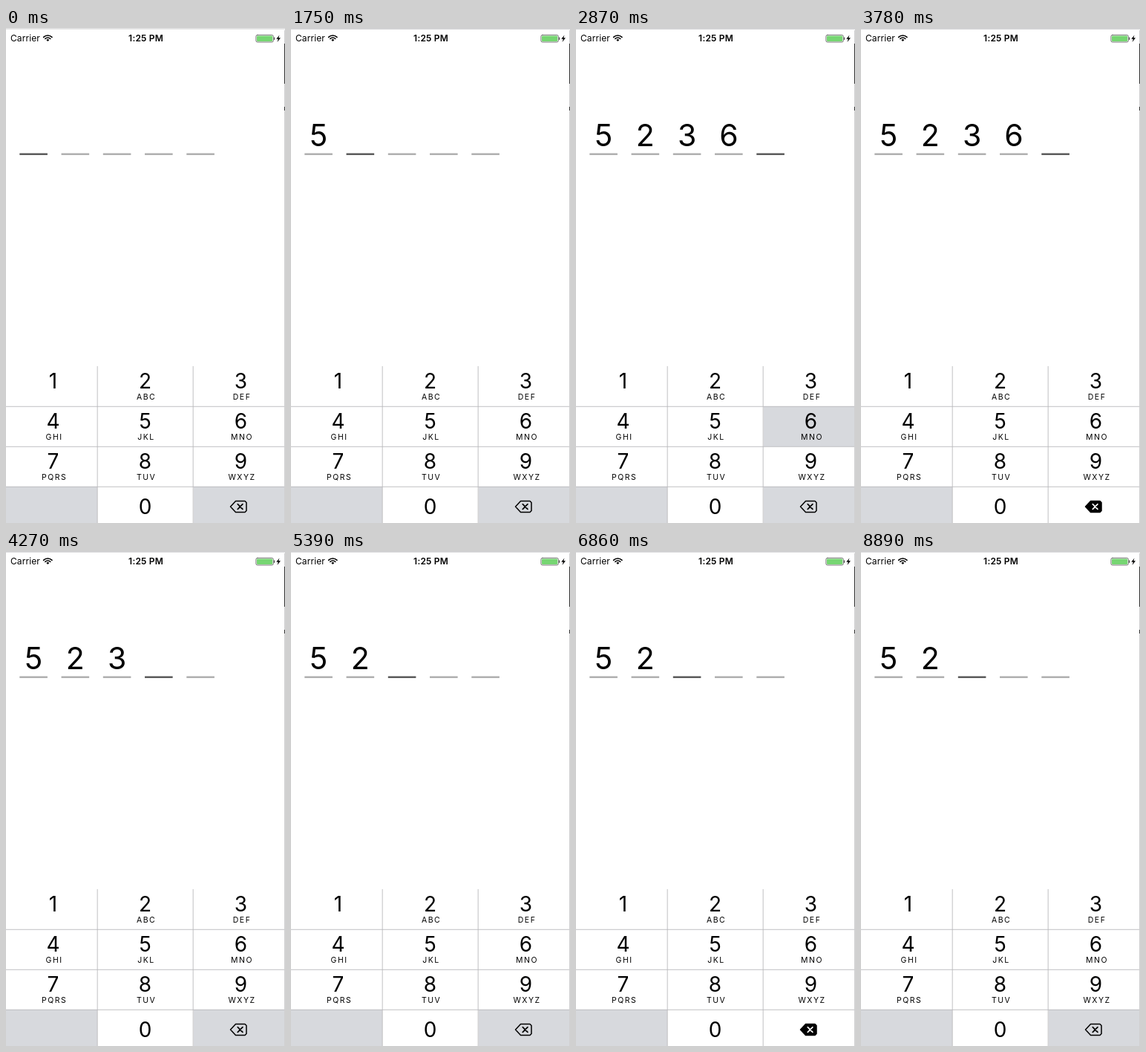
Write an HTML page with a canvas that moves like this. It is 376 by 666 pixels and loops after 9.1 s.

```html
<!DOCTYPE html>
<html lang="en">
<head>
<meta charset="utf-8">
<title>Code entry</title>
<style>
html, body { margin: 0; width: 100%; height: 100%; overflow: hidden; background: #fff; }
canvas { display: block; width: 376px; height: 666px; }
</style>
</head>
<body>
<canvas id="stage"></canvas>
<script>
const W = 376, H = 666, LOOP = 9100;
const FONT = 'Inter, Roboto, sans-serif';
const KEY_GREY = '#d7d9dd', RULE = '#b9babc';
const canvas = document.getElementById('stage');
const ratio = window.devicePixelRatio || 1;
canvas.width = W * ratio;
canvas.height = H * ratio;
const ctx = canvas.getContext('2d');

// Each tap: key, finger down, value changes, highlight ends.
const taps = [
  ['5', 1400, 1470, 1540],
  ['2', 1820, 1960, 2030],
  ['3', 2240, 2310, 2450],
  ['6', 2590, 2660, 2730],
  ['6', 2870, 2940, 3150],
  ['del', 3570, 3570, 3920],
  ['del', 4060, 4060, 4270],
  ['del', 4550, 4550, 4690],
  ['5', 5530, 5600, 5740],
  ['6', 6020, 6020, 6090],
  ['del', 6370, 6370, 6650],
  ['del', 6860, 6860, 7000]
];

const letters = ['', 'ABC', 'DEF', 'GHI', 'JKL', 'MNO', 'PQRS', 'TUV', 'WXYZ'];
const colLeft = [0, 124, 253], colRight = [123, 252, 375];
const colMid = [63.5, 187.5, 316.5];
const rowTop = row => 455 + 54 * row;

function stateAt(t) {
  let code = '', pressed = null;
  for (const [key, down, change, up] of taps) {
    if (t >= change) code = key === 'del' ? code.slice(0, -1) : code + key;
    if (t >= down && t < up) pressed = key;
  }
  return { code, pressed };
}

function rect(x, y, w, h, color) {
  ctx.fillStyle = color;
  ctx.fillRect(x, y, w, h);
}

function text(str, x, y, size, { weight = 400, align = 'center', spacing = 0 } = {}) {
  ctx.font = `${weight} ${size}px ${FONT}`;
  ctx.textAlign = align;
  ctx.letterSpacing = spacing + 'px';
  ctx.fillStyle = '#000';
  ctx.fillText(str, x + (align === 'center' ? spacing / 2 : 0), y);
}

function polygon(points) {
  ctx.beginPath();
  points.forEach(([x, y]) => ctx.lineTo(x, y));
  ctx.closePath();
}

function drawWifi() {
  const x = 56.3, y = 18, half = Math.PI / 4;
  ctx.strokeStyle = ctx.fillStyle = '#000';
  ctx.lineWidth = 1.6;
  for (const r of [5, 8]) {
    ctx.beginPath();
    ctx.arc(x, y, r, -Math.PI / 2 - half, -Math.PI / 2 + half);
    ctx.stroke();
  }
  ctx.beginPath();
  ctx.moveTo(x, y);
  ctx.arc(x, y, 2.8, -Math.PI / 2 - half, -Math.PI / 2 + half);
  ctx.fill();
}

function drawBattery() {
  ctx.strokeStyle = '#555';
  ctx.lineWidth = 0.8;
  ctx.beginPath();
  ctx.roundRect(336.9, 9.4, 23.4, 9.6, 2);
  ctx.stroke();
  ctx.fillStyle = '#76d672';
  ctx.beginPath();
  ctx.roundRect(338, 10.5, 21.2, 7.4, 1);
  ctx.fill();
  rect(361, 12.5, 1.2, 3.4, '#555');
  ctx.fillStyle = '#000';
  polygon([[368.5, 9.5], [364.3, 14.8], [366.8, 14.8], [365.6, 19], [370, 13.3], [367.3, 13.3]]);
  ctx.fill();
}

function drawFrameEdges(t) {
  rect(0, 0, W, 2, t < 1400 ? '#e2e2e3' : '#d2d2d4');
  rect(375, 3, 1, H - 3, '#d0d0d1');
  rect(375, 21, 1, 54, '#333');
  rect(375, 106, 1, 5, '#333');
}

function drawSlots(code) {
  // The focus returns to the first slot once all are filled.
  const active = code.length % 5;
  for (let i = 0; i < 5; i++) {
    const x = 18.3 + 56.25 * i;
    rect(x, 168.5, 37.6, 2.4, i === active ? '#555' : '#adadad');
    if (code[i]) text(code[i], x + 18.8, 159, 41);
  }
}

function drawDelete(down) {
  ctx.lineWidth = 1.5;
  ctx.lineJoin = ctx.lineCap = 'round';
  ctx.strokeStyle = ctx.fillStyle = '#000';
  polygon([[302.5, 644], [309.5, 636.5], [322, 636.5], [324, 638.5],
    [324, 649.5], [322, 651.5], [309.5, 651.5]]);
  if (down) ctx.fill();
  ctx.stroke();
  ctx.strokeStyle = down ? '#fff' : '#000';
  ctx.lineWidth = 1.7;
  ctx.beginPath();
  for (const s of [-1, 1]) {
    ctx.moveTo(312.3, 644 - 3.3 * s);
    ctx.lineTo(318.9, 644 + 3.3 * s);
  }
  ctx.stroke();
}

function drawKeypad(pressed) {
  const fillKey = (col, row) =>
    rect(colLeft[col], rowTop(row), colRight[col] - colLeft[col], row === 3 ? 49 : 54, KEY_GREY);

  fillKey(0, 3);
  if (pressed !== 'del') fillKey(2, 3);
  letters.forEach((label, i) => {
    const col = i % 3, row = Math.floor(i / 3), y = rowTop(row);
    const digit = String(i + 1);
    if (pressed === digit) fillKey(col, row);
    text(digit, colMid[col], y + 30, 28);
    if (label) text(label, colMid[col] + 0.8, y + 45, 10.5, { spacing: 1.5 });
  });
  text('0', colMid[1], 654, 28);
  for (const x of [123, 252]) rect(x - 0.3, 455, 0.9, H - 455, RULE);
  for (const row of [1, 2, 3]) rect(0, rowTop(row) - 0.2, 375, 0.9, RULE);
  drawDelete(pressed === 'del');
}

function draw(t) {
  const { code, pressed } = stateAt(t);
  ctx.setTransform(ratio, 0, 0, ratio, 0, 0);
  rect(0, 0, W, H, '#fff');
  text('Carrier', 6, 18.3, 12, { align: 'left', spacing: 0.1 });
  text('1:25 PM', 188.5, 18.3, 12, { weight: 600, spacing: 0.2 });
  drawWifi();
  drawBattery();
  drawSlots(code);
  drawKeypad(pressed);
  drawFrameEdges(t);
}

const start = performance.now();
function tick() {
  draw((performance.now() - start) % LOOP);
  requestAnimationFrame(tick);
}
tick();
</script>
</body>
</html>
```
